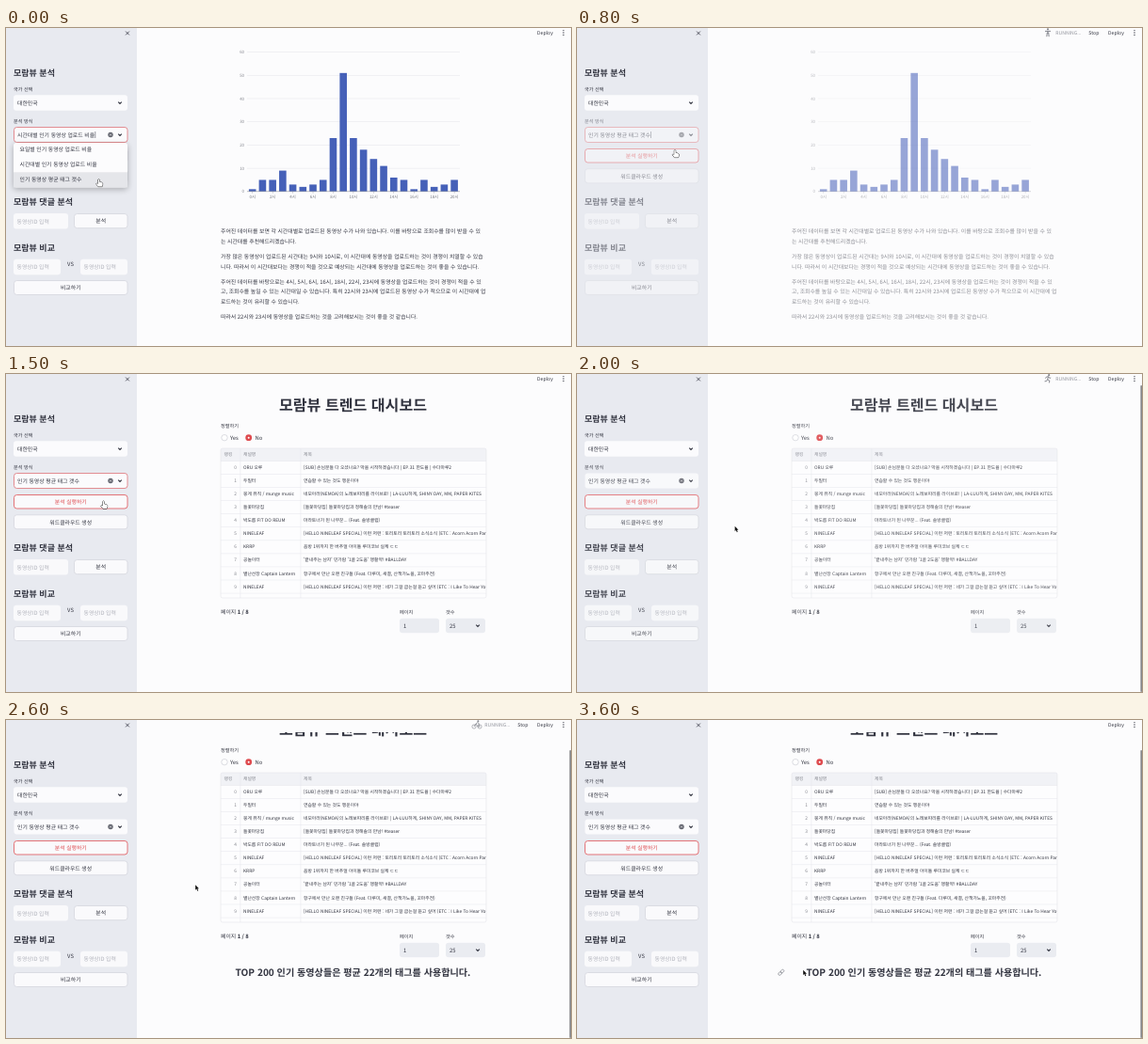
Animation of 600 by 338 pixels, one loop 3.7 s. Source, as an HTML page with a canvas:

```html
<!DOCTYPE html>
<html lang="ko">
<head>
<meta charset="utf-8">
<title>트렌드 대시보드</title>
<style>
html, body { margin: 0; width: 600px; height: 338px; overflow: hidden; background: #fcfcfd; }
canvas { display: block; width: 600px; height: 338px; }
</style>
</head>
<body>
<canvas id="stage"></canvas>
<script>
const LOOP = 3700, STEP = 100;
const FONT = '"Noto Sans CJK KR", "Noto Sans CJK", "Noto Sans", sans-serif';
const INK = '#31333f', RED = '#de4a4e', LINE = '#d3d5dc', PALE = '#b0b2bb', PAGE = '#fcfcfd', SIDE = '#e8eaf0';
const BODY = 5.87, LABEL = 5.15, CELL = 4.82;
const BRAND = '모람뷰';

const canvas = document.getElementById('stage');
const ctx = canvas.getContext('2d');
const dpr = window.devicePixelRatio || 1;
canvas.width = 600 * dpr;
canvas.height = 338 * dpr;

const COUNTS = [1, 5, 5, 9, 3, 2, 3, 5, 23, 51, 23, 18, 14, 11, 6, 5, 1, 5, 2, 3, 5];
const ADVICE = [
  [216, '주어진 데이터를 보면 각 시간대별로 업로드된 동영상 수가 나와 있습니다. 이를 바탕으로 조회수를 많이 받을 수 있'],
  [226.5, '는 시간대를 추천해드리겠습니다.'],
  [243, '가장 많은 동영상이 업로드된 시간대는 9시와 10시로, 이 시간대에 동영상을 업로드하는 것이 경쟁이 치열할 수 있습'],
  [253.5, '니다. 따라서 이 시간대보다는 경쟁이 적을 것으로 예상되는 시간대에 동영상을 업로드하는 것이 좋을 수 있습니다.'],
  [269.5, '주어진 데이터를 바탕으로는 4시, 5시, 6시, 16시, 18시, 22시, 23시에 동영상을 업로드하는 것이 경쟁이 적을 수 있'],
  [280, '고, 조회수를 높일 수 있는 시간대일 수 있습니다. 특히 22시와 23시에 업로드된 동영상 수가 적으므로 이 시간대에 업'],
  [290.5, '로드하는 것이 유리할 수 있습니다.'],
  [307, '따라서 22시와 23시에 동영상을 업로드하는 것을 고려해보시는 것이 좋을 것 같습니다.']
];
const ROWS = [
  ['ORU 오루', '[SUB] 손님분들 다 오셨나요? 막을 시작하겠습니다 | EP.31 한도율 | 수다마루2'],
  ['두밀터', '연습할 수 있는 것도 행운이야'],
  ['뭉게 뮤직 / munge music', '네모아라(NEMOA)의 노래보따리를 라이브로! | LA-LUU하게, SHINY DAY, MM, PAPER KITES'],
  ['들꽃마당집', '[들꽃마당집] 들꽃마당집과 정해솔의 만남! #teaser'],
  ['박도름 FIT DO REUM', '마라토너가 된 나무꾼... (Feat. 솔방클럽)'],
  ['NINELEAF', '[HELLO NINELEAF SPECIAL] 이런 저런 : 토리토리 토리토리 소식소식 (ETC : Acorn Acorn Party)'],
  ['KRRP', '음방 1위까지 한 버추얼 아이돌 루미코브 실체 ㄷㄷ'],
  ['공놀이터', "'끝내주는 남자' 민가람 '1골 2도움' 맹활약! #BALLDAY"],
  ['별난선장 Captain Lantern', '항구에서 만난 오랜 친구들 (Feat. 다루미, 새결, 산책가노을, 꼬마주전)'],
  ['NINELEAF', '[HELLO NINELEAF SPECIAL] 이런 저런 : 네가 그걸 굽는걸 듣고 싶어 (ETC : I Like To Hear You)'],
  ['꿈마루집', '오늘도 놀러와']
];

// time, x, y
const PATH = [[0, 98.5, 161], [100, 98.5, 161], [400, 163.5, 164.5], [500, 158, 160], [800, 104, 130],
  [1500, 103.5, 135.5], [1700, 103.5, 135.5], [2200, 202.5, 176], [2700, 201, 175.2], [3100, 201, 175.5], [3500, 240.2, 265.7]];
const FADE = [[0, 1], [500, 1], [800, .55], [1100, .33], [1200, .8], [1300, 1], [1900, 1], [2300, .57], [2400, .5], [2500, .85], [2600, 1]];
const SCROLL = [[0, 0], [2400, 0], [2600, 23]];

function track(keys, t, i = 1, ease = u => u) {
  for (let k = 1; k < keys.length; k++) {
    const a = keys[k - 1], b = keys[k];
    if (t < b[0]) return a[i] + (b[i] - a[i]) * ease((t - a[0]) / (b[0] - a[0]));
  }
  return keys[keys.length - 1][i];
}
const smooth = u => u * u * (3 - 2 * u);

function text(s, x, y, size = BODY, color = INK, weight = 500, align = 'left') {
  ctx.font = `${weight} ${size}px ${FONT}`;
  ctx.fillStyle = color;
  ctx.textAlign = align;
  ctx.fillText(s, x, y);
}
function rect(x, y, w, h, color) {
  ctx.fillStyle = color;
  ctx.fillRect(x, y, w, h);
}
function box(x, y, w, h, fill, border) {
  ctx.beginPath();
  ctx.roundRect(x, y, w, h, 3);
  ctx.fillStyle = fill;
  ctx.fill();
  if (border) stroke(border, .75);
}
function stroke(color, width) {
  ctx.strokeStyle = color;
  ctx.lineWidth = width;
  ctx.stroke();
}
function lines(color, width, ...paths) {
  ctx.beginPath();
  for (const p of paths)
    for (let i = 0; i < p.length; i += 2) ctx[i ? 'lineTo' : 'moveTo'](p[i], p[i + 1]);
  stroke(color, width);
}
function disc(x, y, r, fill, border) {
  ctx.beginPath();
  ctx.arc(x, y, r, 0, 7);
  if (fill) { ctx.fillStyle = fill; ctx.fill(); }
  if (border) stroke(border, .6);
}
const chevron = (x, y) => lines(INK, 1.1, [x - 1.8, y - .9, x, y + .9, x + 1.8, y - .9]);
const cross = (x, y, r, color, w) => lines(color, w, [x - r, y - r, x + r, y + r], [x + r, y - r, x - r, y + r]);
const heading = (s, y) => text(s, 8, y, 9, INK, 700);

function button(s, x, y, w, h, hot) {
  box(x, y, w, h, '#fafafc', hot ? RED : LINE);
  text(s, x + w / 2, y + h / 2, BODY, hot ? RED : INK, 500, 'center');
}
function field(x, y, w) {
  box(x, y, w, 16.5, '#f9f9fb');
  text('동영상ID 입력', x + 3.5, y + 8.3, BODY, PALE, 400);
}

function sidebar(t, fade) {
  rect(0, 0, 139, 338, SIDE);
  cross(129, 5.5, 1.9, INK, .8);
  heading(BRAND + ' 분석', 47.5);
  text('국가 선택', 8, 65, LABEL);
  box(8, 71.3, 121, 16.5, '#fbfbfd');
  text('대한민국', 12, 79.6);
  chevron(121, 79.6);

  ctx.globalAlpha = fade;
  text('분석 방식', 8, 99, LABEL);
  box(8.5, 105.5, 120.5, 16, '#fbfbfd', t < 1700 ? '#dc6b70' : null);
  const choice = t < 100 ? '시간대별 인기 동영상 업로드 비율' : '인기 동영상 평균 태그 갯수';
  text(choice, 12, 113.6);
  if (t < 100 || (t >= 700 && t < 1100)) rect(12.6 + ctx.measureText(choice).width, 110, .5, 7, INK);
  disc(111, 113.5, 2.7, '#62646e');
  cross(111, 113.5, 1, '#fff', .6);
  chevron(121, 113.5);

  button('분석 실행하기', 8.5, 128.5, 120.5, 14.5, t >= 700);
  button('워드클라우드 생성', 8.5, 149.8, 120.5, 15);
  heading(BRAND + ' 댓글 분석', 185);
  field(8, 197, 58);
  button('분석', 72.5, 197.5, 56.5, 15.2);
  heading(BRAND + ' 비교', 233.5);
  field(8, 245.7, 50);
  field(79, 245.7, 50);
  text('VS', 68.5, 251, BODY, INK, 500, 'center');
  button('비교하기', 8.5, 268.5, 120.5, 15);
  ctx.globalAlpha = 1;

  if (t < 100) menu();
}

function menu() {
  ctx.save();
  ctx.shadowColor = 'rgba(0,0,0,.28)';
  ctx.shadowBlur = 6 * dpr;
  ctx.shadowOffsetY = 2 * dpr;
  box(8, 122, 121, 47.5, '#fcfcfd');
  ctx.restore();
  rect(8, 153.3, 121, 16.2, '#e5e6ea');
  ['요일별 인기 동영상 업로드 비율', '시간대별 인기 동영상 업로드 비율', '인기 동영상 평균 태그 갯수']
    .forEach((s, i) => text(s, 14.5, 129 + 16 * i));
}

function chart() {
  const base = 173.8, unit = 2.47, gap = 10.72;
  for (let v = 0; v <= 60; v += 10) {
    const y = base - v * unit;
    rect(256, y - .25, 226, .5, '#e2e3e8');
    text(v, 253, y, 4.4, '#85878f', 400, 'right');
  }
  COUNTS.forEach((v, i) => {
    const x = 261.7 + i * gap;
    rect(x - 3.8, base - v * unit, 7.6, v * unit, '#4560b8');
    if (i % 2 === 0) {
      rect(x - .2, base, .4, 2, '#9a9ca4');
      text(i + '시', x, 179, 4.4, '#74767e', 400, 'center');
    }
  });
  rect(256, base - .2, 226, .5, '#85878f');
  for (const [y, s] of ADVICE) text(s, 228, y);
}

function table() {
  const top = 79, h = 159, rowH = 14.05, grid = '#e4e5ea', muted = '#85878f';
  ctx.save();
  ctx.beginPath();
  ctx.roundRect(228, top, 282, h, 2);
  ctx.clip();
  rect(228, top, 282, h, '#fdfdfe');
  rect(228, top, 282, 13.5, '#f1f2f6');
  text('랭킹', 231.5, 85.6, CELL, muted);
  text('채널명', 252, 85.6, CELL, muted);
  text('제목', 316, 85.6, CELL, muted);
  ROWS.forEach(([name, title], i) => {
    const y = 99.3 + i * rowH;
    rect(228, y - 7, 282, .5, grid);
    text(i, 245, y, CELL, muted, 400, 'right');
    text(name, 252, y, CELL);
    text(title, 316, y, CELL);
  });
  rect(248.7, top, .5, h, grid);
  rect(312.7, top, .5, h, grid);
  ctx.restore();
  ctx.beginPath();
  ctx.roundRect(228, top, 282, h, 2);
  stroke(grid, .6);
}

function dashboard(t) {
  text(BRAND + ' 트렌드 대시보드', 368.5, 33, 16.1, INK, 700, 'center');
  text('정렬하기', 228, 55.3, LABEL);
  disc(232, 67.7, 3.2, '#fff', '#c4c6ce');
  text('Yes', 238, 67.7);
  disc(257.7, 67.7, 3.4, RED);
  disc(257.7, 67.7, 1, '#fff');
  text('No', 264.5, 67.7);
  table();

  text('페이지 ', 228, 253);
  text('1 / 8', 228 + ctx.measureText('페이지 ').width, 253, BODY, INK, 700);
  text('페이지', 418, 253, LABEL);
  text('갯수', 467, 253, LABEL);
  box(418, 259.7, 42, 15.6, '#eaecf1');
  box(467, 259.7, 42, 15.6, '#eaecf1');
  text('1', 422, 267.6);
  text('25', 471, 267.6);
  chevron(501, 267.6);

  if (t >= 2500) text('TOP 200 인기 동영상들은 평균 22개의 태그를 사용합니다.', 368.5, 291, 10.1, INK, 700, 'center');
  if (t >= 3400) link(216.8, 291.3);
}

function link(x, y) {
  ctx.save();
  ctx.translate(x, y);
  ctx.rotate(-Math.PI / 4);
  for (const dx of [-3.7, -.3]) {
    ctx.beginPath();
    ctx.roundRect(dx, -1.4, 4, 2.8, 1.4);
    stroke('#85878f', .7);
  }
  ctx.restore();
}

const POSES = {
  bike() {
    disc(-3, 2, 2.1, null, '#85878f');
    disc(3, 2, 2.1, null, '#85878f');
    disc(1.4, -3.8, 1, '#85878f');
    lines('#85878f', .8, [-3, 2, -1, -1, 1, 2, 3, 2, 1.8, -1.2], [-1, -1, .8, -2.4, 2.6, -1]);
  },
  stand() {
    disc(0, -3.7, 1.1, '#85878f');
    lines('#85878f', 1, [-3, -1.6, 3, -1.6], [0, -2, 0, 1], [-1.2, 4.2, -.7, 0, .7, 0, 1.2, 4.2]);
  },
  run() {
    disc(1.2, -3.8, 1.1, '#85878f');
    lines('#85878f', 1, [.6, -2.4, -.4, .8, 1.8, 2, 1.5, 4.4], [-.4, .8, -1.4, 2.6, -3.4, 2.8], [-2.6, -.4, -1.4, -2, .6, -2.2, 1.8, -.6, 3.2, -1]);
  }
};
const CYCLE = ['run', 'bike', 'stand', 'run', 'stand'];

function header(t) {
  rect(139, 0, 461, 13, PAGE);
  if ((t >= 200 && t < 1100) || (t >= 1700 && t < 2900)) {
    ctx.save();
    ctx.translate(500, 5);
    POSES[CYCLE[Math.floor(t / 400) % 5]]();
    ctx.restore();
    text('RUNNING...', 508.3, 5, 5.1, '#92949c', 400);
    text('Stop', 543.3, 5, LABEL);
  }
  text('Deploy', 564, 5, LABEL);
  for (const y of [2.6, 5, 7.4]) disc(592, y, .65, INK);
}

function scrollbar(t, dy) {
  const thumb = (y, h) => box(598.4, y, 1.6, h, '#85878b');
  if (t >= 300 && t < 600) thumb(162, 160);
  if (t >= 1700) thumb(12 + dy * .87, 326 - dy * .87);
}

function pointer(t) {
  ctx.save();
  ctx.translate(track(PATH, t, 1, smooth), track(PATH, t, 2, smooth));
  ctx.lineJoin = 'round';
  const hand = t < 200 || (t >= 700 && t < 1800);
  const shape = hand
    ? 'M-.7 0Q0-.9.7 0L.8 2.8 3 3.2Q4.4 3.5 4.2 5L3.6 7.6H-.6L-2.7 4.8Q-2.6 3.6-.7 4.7Z'
    : 'M0 0V5.4L1.2 4.3 2.2 6.5 3.1 6.1 2.2 4H3.8Z';
  const p = new Path2D(shape);
  ctx.lineWidth = .9;
  ctx.strokeStyle = hand ? '#222' : '#fff';
  ctx.fillStyle = hand ? '#fff' : '#111';
  ctx.stroke(p);
  ctx.fill(p);
  ctx.restore();
}

function draw(t) {
  ctx.setTransform(dpr, 0, 0, dpr, 0, 0);
  ctx.textBaseline = 'middle';
  ctx.textRendering = 'geometricPrecision';
  const fade = track(FADE, t), dy = track(SCROLL, t);
  rect(0, 0, 600, 338, PAGE);
  ctx.save();
  ctx.globalAlpha = fade;
  ctx.translate(0, -dy);
  if (t < 1200) chart(); else dashboard(t);
  ctx.restore();
  header(t);
  sidebar(t, fade);
  scrollbar(t, dy);
  pointer(t);
}

const start = performance.now();
function tick() {
  const t = (performance.now() - start) % LOOP;
  draw(Math.floor(t / STEP) * STEP);
  requestAnimationFrame(tick);
}
tick();
</script>
</body>
</html>
```
